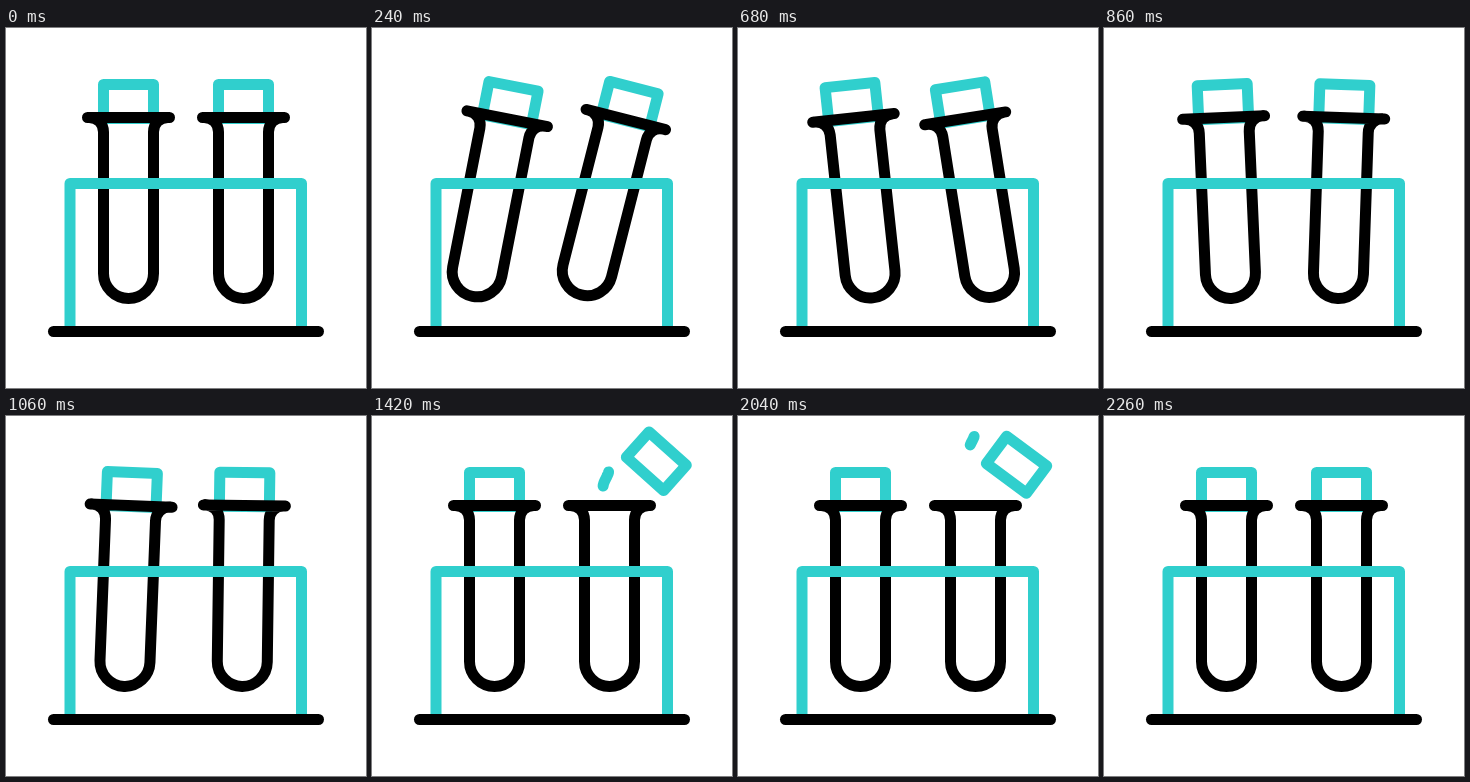
An HTML page for the animation above (2400 ms loop, 360 by 360 pixels).

```html
<!DOCTYPE html>
<html lang="en">
<head>
<meta charset="utf-8">
<title>Test tubes</title>
<style>
  html, body { margin: 0; width: 100%; height: 100%; overflow: hidden; background: #fff; }
  svg { display: block; width: 100%; height: 100%; }
  path { fill: none; stroke: #000; stroke-width: 11; stroke-linecap: round; stroke-linejoin: round; }
  .teal { stroke: #30cfcd; }
</style>
</head>
<body>
<svg viewBox="0 0 360 360">
  <path id="steam" class="teal"/>
  <g id="left">
    <path class="teal" d="M97.5 56.5h50v34h-50z"/>
    <path d="M81.5 89.5h82M83 89.5C92 89.5 97.5 96 97.5 104V245.5a25 25 0 0 0 50 0V104C147.5 96 153 89.5 162 89.5"/>
  </g>
  <g id="right">
    <path id="cap" class="teal" d="M-25 -17h50v34h-50z"/>
    <path transform="translate(115)" d="M81.5 89.5h82M83 89.5C92 89.5 97.5 96 97.5 104V245.5a25 25 0 0 0 50 0V104C147.5 96 153 89.5 162 89.5"/>
  </g>
  <path class="teal" d="M64 303V155.5H295.5V303"/>
  <path d="M47.5 303.5H312.5"/>
</svg>
<script>
const LOOP = 2400;
const $ = id => document.getElementById(id);
const linear = u => u;
const smooth = u => (1 - Math.cos(Math.PI * u)) / 2;

// keys: [time, value] pairs in order of time
function track(keys, t, ease) {
  if (t <= keys[0][0]) return keys[0][1];
  for (let i = 1; i < keys.length; i++) {
    const [t0, a] = keys[i - 1], [t1, b] = keys[i];
    if (t < t1) return a + (b - a) * ease((t - t0) / (t1 - t0));
  }
  return keys[keys.length - 1][1];
}

const SWING = [[0, 0], [376, 20], [722, -10], [920, 5], [1110, 0]];
const LIFT = [[1100, 0], [1533, 1], [1720, 0.89], [1960, 0.89], [2260, 0]];
const HEAD = [[1100, 89], [1420, 56], [1780, 20.5]];
const TAIL = [[1100, 89], [1800, 47.5], [2150, 20.5]];
const LAG = 40;

function steamPath(head, tail) {
  if (tail - head < 0.5) return "";
  const n = 16, points = [];
  for (let i = 0; i <= n; i++) {
    const y = tail + (head - tail) * i / n;
    const x = 234 + 3 * Math.cos(2 * Math.PI * (y - 53) / 37);
    points.push(x.toFixed(2) + " " + y.toFixed(2));
  }
  return "M" + points.join("L");
}

function draw(t) {
  const tilt = (id, x, time) =>
    $(id).setAttribute("transform", `rotate(${track(SWING, time, smooth)} ${x} 155.5)`);
  tilt("left", 122.5, t - LAG);
  tilt("right", 237.5, t);

  const k = track(LIFT, t, smooth);
  $("cap").setAttribute("transform",
    `translate(${237.5 + 55.5 * k} ${73.5 - 33.5 * k}) rotate(${49.5 * k})`);
  $("steam").setAttribute("d", steamPath(track(HEAD, t, linear), track(TAIL, t, linear)));
}

const start = performance.now();
function frame() {
  draw((performance.now() - start) % LOOP);
  requestAnimationFrame(frame);
}
frame();
</script>
</body>
</html>
```
